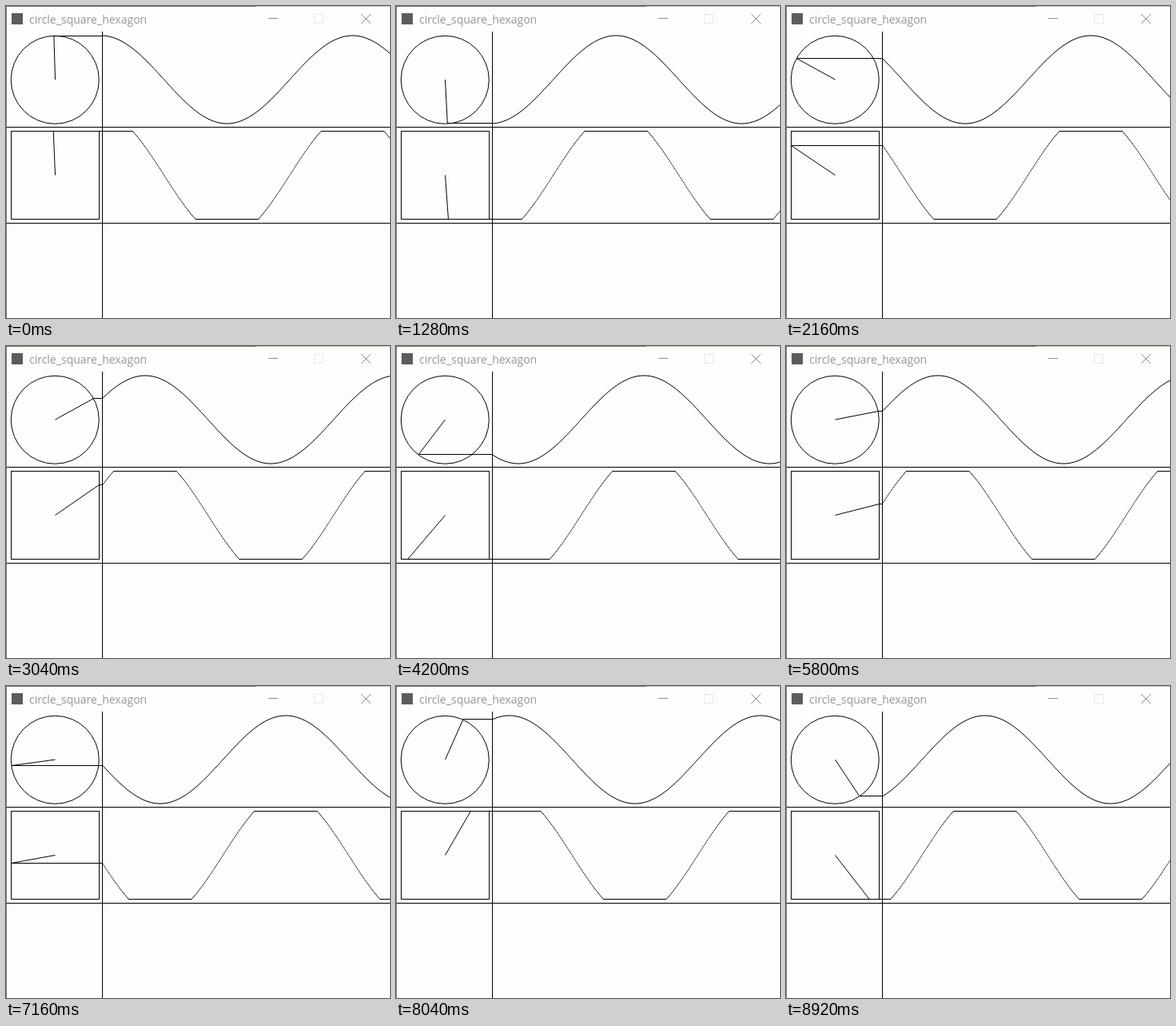
An HTML page with a canvas for the animation above (8960 ms loop, 480x390 px).

```html
<!DOCTYPE html>
<html lang="en">
<head>
<meta charset="utf-8">
<title>circle_square_hexagon</title>
<style>
  html, body { margin: 0; width: 480px; height: 390px; overflow: hidden; background: #fdfdfb; }
  svg, canvas { position: absolute; left: 0; top: 0; display: block; }
  text { font: 14px "Open Sans", "Noto Sans", sans-serif; fill: #989892; }
</style>
</head>
<body>
<svg width="480" height="390" viewBox="0 0 480 390" fill="none" stroke="#000">
  <!-- window frame -->
  <path d="M0 .5H313M.5 0V390" stroke="#77776c"/>
  <path d="M313 .5H480" stroke="#c4c4ba"/>
  <rect x="7" y="9" width="14" height="14" fill="#5c5c58" stroke="none"/>
  <text x="29" y="21.5" stroke="none">circle_square_hexagon</text>
  <path d="M328 15.5H340" stroke="#8c8c88"/>
  <rect x="385.5" y="10.5" width="11" height="11" stroke="#e8e8ea"/>
  <path d="M444 10L456 22M456 10L444 22" stroke="#8c8c88"/>
  <!-- grid and shapes -->
  <path d="M120.5 32V390M1 151.5H480M1 271.5H480"/>
  <circle cx="61.25" cy="92.25" r="55"/>
  <rect x="6.5" y="156.5" width="110" height="110"/>
</svg>
<canvas id="stage" width="480" height="390"></canvas>
<script>
const ctx = document.getElementById("stage").getContext("2d");
const LOOP = 8960, TICK = 40;
const CENTER_X = 61, AXIS_X = 120, WIDTH = 480;
const STEP = 0.02;           // radians per pixel of history
const STEPS_PER_TICK = 4.848;
const START = 1.6;
const PAUSES = [84, 170];    // ticks that repeat the previous pose

const clamp = v => Math.max(-1, Math.min(1, v));
const rows = [
  { cy: 91.5, shape: v => v },
  { cy: 211, shape: v => clamp(v * Math.SQRT2) }
];
const RADIUS = 55;

function angleAt(time) {
  const tick = Math.floor((time % LOOP) / TICK);
  const moved = tick - PAUSES.filter(p => tick >= p).length;
  return START - STEP * Math.ceil(moved * STEPS_PER_TICK);
}

function drawRow({ cy, shape }, angle) {
  const height = a => cy - RADIUS * shape(Math.sin(a));
  const x = CENTER_X + RADIUS * shape(Math.cos(angle));
  const lineY = Math.round(height(angle)) + 0.5;

  ctx.beginPath();
  ctx.moveTo(CENTER_X + 0.5, cy + 0.5);
  ctx.lineTo(x + 0.5, lineY);
  ctx.lineTo(AXIS_X, lineY);
  ctx.stroke();

  for (let px = AXIS_X; px < WIDTH; px++) {
    ctx.fillRect(px, height(angle + STEP * (px - AXIS_X)), 1, 1);
  }
}

function draw() {
  const angle = angleAt(performance.now());
  ctx.clearRect(0, 0, WIDTH, 390);
  rows.forEach(row => drawRow(row, angle));
  requestAnimationFrame(draw);
}
draw();
</script>
</body>
</html>
```
